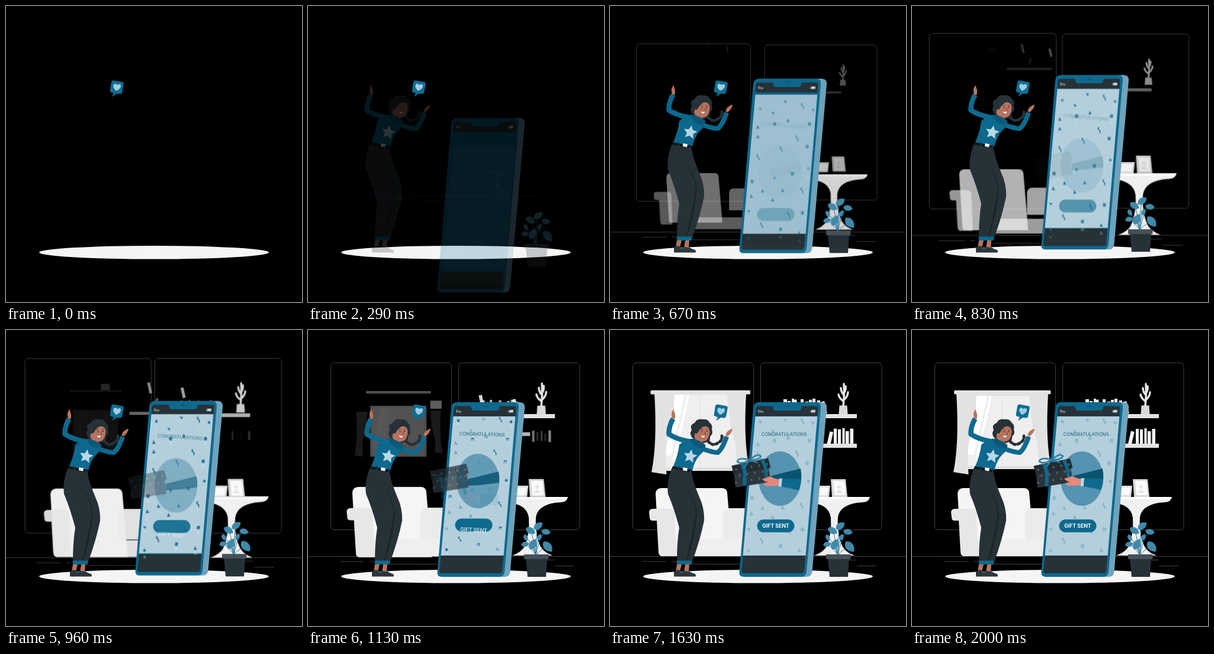
An HTML page that plays this animation: 500x500 px, repeating every 2040 ms.

```html
<!DOCTYPE html>
<html lang="en">
<head>
<meta charset="utf-8">
<title>Gift sent</title>
<style>
html, body { margin: 0; width: 100%; height: 100%; overflow: hidden; background: #000; }
svg { display: block; width: 100vw; height: 100vh; }
[data-zoom], [data-tilt] { transform-box: fill-box; transform-origin: center; }
[data-grow] { transform-box: view-box; transform-origin: 0 0; }
#room { transform-box: view-box; transform-origin: 250px 250px; }
.line { fill: none; stroke: #525252; stroke-width: .8; vector-effect: non-scaling-stroke; }
text { font-family: Inter, "Open Sans", sans-serif; text-anchor: middle; }
</style>
</head>
<body>
<svg viewBox="0 0 500 500">
  <g id="room">
    <path class="line" d="M0 382.500H500M53 391H95M104 391h8M132 395.500H219M370 388.500H416M417 398.500H450"/>
    <rect class="line" data-zoom="80" x="38.500" y="55.500" width="204" height="282" rx="6"/>
    <rect class="line" data-zoom="100" x="254.500" y="55.500" width="204.500" height="282" rx="6"/>

    <g data-zoom="820">
      <rect x="82" y="107" width="141" height="128" fill="#e0e0e0"/>
      <rect x="87" y="111" width="131" height="119" fill="#efefef"/>
      <path d="M108 111h19l-22 100h-18v-8zM131 111h4l-24 108h-4z" fill="#fff"/>
      <path d="M152 111v119" stroke="#e4e4e4" stroke-width="1.500"/>
    </g>
    <path data-zoom="950" d="M75 108H109Q107 160 96 190Q93 205 95.500 244L70 240Q80 190 75 108Z" fill="#e2e2e2"/>
    <path data-zoom="950" d="M230 108H198Q201 160 211 188Q214 205 212 234L236 237Q225 190 230 108Z" fill="#e2e2e2"/>
    <rect data-zoom="820" x="71" y="102" width="163.500" height="6.500" rx="2" fill="#e8e3e3"/>

    <rect data-grow="700" x="258" y="149" width="24" height="17" fill="#999"/>
    <rect data-grow="600" x="287" y="192" width="130" height="7" fill="#e2e2e2"/>
    <g id="lowBooks" fill="#f2f2f2"></g>
    <rect data-zoom="445" x="291" y="142" width="126" height="7" fill="#e2e2e2"/>
    <g id="topBooks" fill="#f2f2f2"></g>
    <g data-zoom="350">
      <path d="M387.500 127.500h13l1 14.500h-15z" fill="#d9d9d9"/>
      <path d="M394 128Q396 112 395 91M394 120Q387 115 386 109M395 118Q402 112 402 105M395 110Q390 104 390 98M395 107Q399 101 398 95" fill="none" stroke="#e6e6e6" stroke-width="3.400" stroke-linecap="round"/>
    </g>

    <path data-zoom="305" d="M77 277q0-9 9-10H189q8 0 9 8L207 382H88q-4 0-5-5Z" fill="#f5f5f5"/>
    <path data-zoom="340" d="M110 353H260v29H110z" fill="#efefef"/>
    <path data-zoom="320" d="M191 311q1-10 10-10h60v52h-70z" fill="#ebebeb"/>
    <path data-zoom="340" d="M66 308q0-6 7-6h27q9 0 9 8l3 72H88q-5 0-6-6L79 322H72q-5 0-5-5z" fill="#e6e7e6"/>

    <g data-zoom="80">
      <path d="M319 282H439q-2 9-12 9q-38 2-42 25q-2 30 8 50q6 10 20 15H345q14-5 20-14q10-22 8-50q-3-24-40-26q-12 0-14-9Z" fill="#f0f0f0"/>
      <path d="M319 282H439l-2 4H321z" fill="#fff"/>
    </g>
    <g data-zoom="150">
      <path d="M346 263h26l-2 19h-26z" fill="#dedede"/><path d="M350 266h19l-2 13h-19z" fill="#fafafa"/>
    </g>
    <g data-zoom="190">
      <path d="M373 252h25l3 30h-26z" fill="#d8d8d8"/><path d="M377 255h19l2 24h-19z" fill="#fafafa"/>
      <circle cx="387" cy="265" r="3" fill="#e4e4e4"/><path d="M382 275q5-10 10 0z" fill="#e4e4e4"/>
    </g>
  </g>

  <ellipse cx="250" cy="416.300" rx="194" ry="11.300" fill="#f5f5f5"/>

  <g data-slide="0" data-by="30">
    <g id="leaves" fill="#4089aa" stroke="#2f7797" stroke-width="1"></g>
    <path d="M368 386h36l-2 31h-31z" fill="#263238"/>
    <rect x="365" y="379" width="41.500" height="8" fill="#455059"/>
  </g>

  <g data-slide="0" data-by="88">
    <path d="M255 122H357q10 0 9 10L341.500 408q-1 9-10 9H240z" fill="#6ea3bb"/>
    <path d="M252 122H348q9 0 8 9L332 408q-1 9-9 9H226q-8 0-7.500-8L242 131q1-9 10-9Z" fill="#0e698e"/>
    <path d="M251 128.500H348q4 0 3.500 4L350.500 145.500H245.500L246.500 132q.5-3.500 4.500-3.500Z" fill="#263238"/>
    <path d="M274 122l2 10.500q1 3.500 4 3.500h39q3 0 4-3.500l2-10.500z" fill="#0e698e"/>
    <path d="M296.500 129h.5M300 129h1.500" stroke="#144c65" stroke-width="1.800" stroke-linecap="round"/>
    <path d="M251 134.500v5M253.500 135.500v4M256 136.500v3M258 137v2.500" stroke="#aeb8bc" stroke-width="1.300"/>
    <path d="M340 135h7l-.5 4.500h-7zM338 136.500h1v2h-1z" fill="#c6cfd3"/>
    <path d="M224.500 381H330.500L328 407q-.5 4-4 4H226q-4 0-4-4z" fill="#263238"/>
    <path data-slide="90" data-by="26" d="M245.500 146H350.300L330.500 381H224.500z" fill="#b4cfdb"/>
    <g id="confetti"></g>
    <ellipse data-slide="560" cx="287" cy="251" rx="36.300" ry="46" fill="#5593b0"/>
    <path data-slide="580" d="M270 247L322 234Q324 243 323 253L290 257L270 258Z" fill="#09536f"/>
    <g data-slide="970">
      <path d="M290 250L323 251Q322 262 319 270L290 264Z" fill="#0e698e"/>
      <path d="M285 250.500l6-.5-1.500 14-5-.5z" fill="#b9d6e3"/>
    </g>
    <g data-slide="375">
      <rect x="248.500" y="320" width="63" height="21.800" rx="10.900" fill="#0e698e"/>
    </g>
    <g data-slide="620"><text data-tilt="620" x="280" y="334" font-size="8.700" font-weight="700" fill="#fff">GIFT SENT</text></g>
    <g data-slide="450"><text data-tilt="490" x="294" y="178.700" font-size="7.800" fill="#155f7d">CONGRATULATIONS</text></g>
  </g>

  <g data-slide="650">
    <path d="M209 238L268 229L271 257L212 266.500Z" fill="#2b353c"/>
    <path d="M205.500 229.500L267 217L271.500 233L208.500 243.500Z" fill="#222c32"/>
    <g id="stars" fill="#59636a"></g>
  </g>
  <g data-slide="840" fill="#0e698e">
    <path d="M220 227l7-1.500 4 15-.5 23-6 1 .5-22z"/>
    <path d="M254 220l6-1.300 5 15 3 23.500-5 .8-3-23z"/>
  </g>
  <g data-slide="960">
    <path d="M236 219Q217 214 215 222Q222 228 236 219Q250 207 255 213Q252 220 236 219ZM236 219l-9 12M236 219l14 5" fill="none" stroke="#307e9f" stroke-width="2.600" stroke-linejoin="round"/>
  </g>
  <path data-slide="970" d="M257 251Q264 250 270 246.500Q275 249 285 252L284.500 262Q273 263 268 263Q260 263 259 259Q264 257 268 256Q260 256 257 251Z" fill="#e9897a"/>

  <g data-fade="0">
    <path d="M166 188Q173 197 182 191Q190 187 189 179" fill="none" stroke="#263238" stroke-width="5" stroke-linecap="round" stroke-dasharray="3 4.500"/>
    <path d="M164 186Q173 197 182 191Q190 187 189 178" fill="none" stroke="#263238" stroke-width="3.200" stroke-linecap="round"/>
    <path d="M140 183Q133 176 138 169Q134 160 143 157Q147 149 156 151Q165 150 168 156Q174 161 172 168Q175 175 169 180Q170 188 162 190Q148 195 140 183Z" fill="#263238"/>
    <path d="M105 150Q103 143 104.500 138.500L107.500 133.500L108.500 138Q111 142 109.500 150Z" fill="#b9735f"/>
    <path d="M195.500 178.500Q196 172 201 169.500L206 166.500Q207.500 168 205.500 171.500Q203 177 198.500 179.500Z" fill="#b9735f"/>
    <path d="M145 176L144 188L156 191L158 184Z" fill="#a0604e"/>
    <path d="M106.500 150Q99 163 99.500 176Q112 184.500 136 189" fill="none" stroke="#0e698e" stroke-width="8.500" stroke-linejoin="round"/>
    <path d="M197 180Q190 201 182 207Q174 207 157 201" fill="none" stroke="#0e698e" stroke-width="8" stroke-linejoin="round"/>
    <path d="M128 185Q140 182 149 186L161 194Q162 203 152 211Q143 220 139 238L106.500 231Q115 212 117 194Z" fill="#0e698e"/>
    <path d="M135 184Q145 182 161 194Q159 200 152 200Q141 197 135 184Z" fill="#0b5878"/>
    <path d="M117 194Q122 196 126 193M161 195Q158 203 154 207" fill="none" stroke="#0a5270"/>
    <path d="M146 172Q151 164 160 162Q168 163 168.500 171Q168 183 162 187Q155 190 148 186Q141 184 143 176Q144 173 146 172Z" fill="#b9735f"/>
    <path d="M142 174Q143 161 155 157Q166 156 169 166Q162 160 156 164Q150 169 147 175Z" fill="#263238"/>
    <path d="M153 177Q157 180 161 177Q160 183 157 182Q153 181 153 177Z" fill="#fff" stroke="#7b3730" stroke-width=".6"/>
    <path d="M155.500 171v1M163.500 170.500v1" stroke="#263238" stroke-width="1.600" stroke-linecap="round"/>
    <path d="M153 168.500l4-1M162 167.500l3.500 1M160 172l1.500 3.500h-2" fill="none" stroke="#633529" stroke-width=".8"/>
    <path id="bigStar" fill="#b9d8e6"/>
    <path d="M106 230L139 236.500L138 241L104 235Z" fill="#11181b"/>
    <path d="M123.500 232l7.500 1.500-1 5-7-1.500z" fill="#fff"/>
    <path d="M116 230v6M136 234v6" stroke="#263238" stroke-width="2"/>
    <path d="M104 234L138 240.500Q139 253 150 280Q160 301 159 322Q152 356 139 391H113Q113 358 117 334Q108 300 98 277Q95 258 104 234Z" fill="#263238"/>
    <path d="M127 264Q143 288 145 309Q138 352 128 391H130Q144 348 147 309Q144 285 127 264Z" fill="#1b2529"/>
    <path d="M113 396h8l-3 12h-7zM127 396h7l-1 12h-8z" fill="#b9735f"/>
    <path d="M112.500 389.500H139L137.500 396H113Z" fill="#0e698e"/>
    <path d="M108 416.500V408Q114 403 120 407Q127 411 136 411.500Q138 416 135 416.500ZM121 416.500L124 406Q130 409 134 407Q138 411 144 412Q146 416 144 416.500Z" fill="#2c373d"/>
    <path d="M119 409h4M133 407l3 2" stroke="#8fb2c2" stroke-width=".8"/>
  </g>

  <g>
    <path d="M182 125.700L196 128.200Q199.300 129 198.800 132L196 146Q195.300 149 192 148.500L187 148L179 153.500L182 147L178 146Q175.300 145.300 175.800 142L178 128.500Q178.800 125.200 182 125.700Z" fill="#0f6d93"/>
    <path d="M186 143.500Q178.500 136 182.500 132Q186 130 188 133.500Q191.500 130.500 194 133.500Q195.500 139 186 143.500Z" fill="#9fcde0"/>
  </g>
</svg>

<script>
const EASE = 'cubic-bezier(.36,-.01,.5,1.38)';
const LOOP = 2040, HOLD = 130, STEP = 1000 / 24;
const $ = id => document.getElementById(id);

function starPath(x, y, r, turn = 0) {
  let d = '';
  for (let i = 0; i < 10; i++) {
    const a = turn + i * Math.PI / 5, q = i % 2 ? r * .48 : r;
    d += `${i ? 'L' : 'M'}${(x + q * Math.sin(a)).toFixed(1)} ${(y - q * Math.cos(a)).toFixed(1)}`;
  }
  return d + 'Z';
}

// Books: x, width, height, lean, start time. Leaning ones fly in from the corner.
const book = base => ([x, w, h, lean, start]) =>
  `<g data-${lean ? 'grow' : 'zoom'}="${start}"><rect x="${x}" y="${base - h}" width="${w}" height="${h}" transform="rotate(${lean} ${x} ${base})"/></g>`;
$('topBooks').innerHTML = [
  [293, 6, 25, 0, 640], [300, 5, 22, 0, 650], [307, 4, 26, 0, 630], [314, 6, 24, -12, 560],
  [322, 5, 25, 0, 640], [330, 5, 21, 0, 660], [336, 5, 24, 0, 650], [342, 5, 26, 0, 640],
  [350, 5, 23, 0, 660], [361, 6, 21, -13, 510]
].map(book(142)).join('');
$('lowBooks').innerHTML = [
  [365, 6, 22, 13, 640], [378, 5, 25, 0, 750], [385, 5, 24, 0, 900],
  [392.5, 4, 26, 0, 850], [398, 5.5, 21, 0, 920], [405.5, 5.5, 25, 0, 720]
].map(book(192)).join('');

// Leaves: x, y, length, turn
$('leaves').innerHTML = [
  [389, 331, 9, -35], [376, 339, 9, 30], [402, 341, 8, 10], [368, 351, 6, 65],
  [391, 350, 6, -65], [367, 362, 7, -10], [380, 362, 10, -60], [405, 366, 11, 50]
].map(([x, y, r, a]) =>
  `<path fill="none" d="M385 380Q${(x + 382) / 2} ${y + 4} ${x} ${y}"/>` +
  `<path stroke="none" transform="translate(${x} ${y}) rotate(${a}) scale(${r})" d="M-1 0C-.6-.8 .4-.8 1 0C.4 .8-.6 .8-1 0Z"/>`).join('');

// Confetti shapes with their start times
const shapes = {
  o: ['<circle r="2.400"/>', 330],
  t: ['<path d="M-3-2L3-1L1 3Z"/>', 190],
  u: ['<path d="M-1-3.500L3 2.500L-3 3Z"/>', 220],
  q: ['<path d="M-2-3.500L3-2.500L2 3L-3 2Z"/>', 240],
  s: ['<path d="M-1-6q-2 3 1 5t1 5.500l2-.5q2-4-1-6t0-4z"/>', 270]
};
const spots = '254 155 o,275 171 t,296 152 t,324 155 s,343 157 o,301 182 u,337 187 q,250 193 u,278 187 q,' +
  '315 210 s,250 209 u,333 225 q,288 228 s,249 242 s,335 256 o,278 272 o,308 271 q,240 284 q,258 301 u,' +
  '292 300 u,323 298 s,239 310 u,275 316 u,325 337 q,234 337 t,255 357 s,288 365 q,301 340 s,234 373 o,320 372 u';
$('confetti').innerHTML = spots.split(',').map(s => {
  const [x, y, k] = s.split(' ');
  const [shape, start] = shapes[k];
  const piece = (at, fill, alpha) =>
    `<g data-slide="${at}"><g transform="translate(${x} ${y})" fill="${fill}" opacity="${alpha}">${shape}</g></g>`;
  return piece(start, '#1f7296', .95) + piece(start + 220, '#c8dfe8', .64);
}).join('');

let stars = '';
for (let i = 0; i < 14; i++) {
  const u = (i % 5) * 13 + (i > 4 && i < 10 ? 6 : 0), row = Math.floor(i / 5);
  stars += starPath(213 + Math.min(u, 54), 236 + row * 11 - u * .17, 2.6, i);
}
$('stars').innerHTML = `<path d="${stars}"/>`;
$('bigStar').setAttribute('d', starPath(135.5, 213.5, 12, .2));

const anims = [];
function play(el, frames, delay, opts = {}) {
  const a = el.animate(frames, { delay: +delay, duration: 1000, easing: EASE, fill: 'both', ...opts });
  a.pause();
  anims.push(a);
}
const each = (name, fn) =>
  document.querySelectorAll(`[data-${name}]`).forEach(el => fn(el, el.dataset[name]));
const enter = (from, to) => [{ opacity: 0, transform: from }, { opacity: 1, transform: to }];
const zoom = (el, at) => play(el, enter('scale(.5)', 'scale(1)'), at);

each('zoom', zoom);
each('grow', zoom);
each('slide', (el, at) => play(el, enter(`translateY(${el.dataset.by || 30}px)`, 'translateY(0px)'), at));
each('fade', (el, at) => play(el, [{ opacity: 0 }, { opacity: 1 }], at));
each('tilt', (el, at) => play(el, [{ transform: 'rotate(5deg)' }, { transform: 'rotate(0deg)' }],
  +at + 340, { duration: 450, easing: 'linear' }));
play($('room'), enter('scale(.4)', 'scale(1)'), 0);

const origin = performance.now();
function draw() {
  const t = Math.max(0, performance.now() - origin) % LOOP;
  const n = Math.floor((t - HOLD + 5.5) / STEP);
  const time = t < HOLD ? 0 : HOLD + n * STEP;
  for (const a of anims) a.currentTime = time;
  requestAnimationFrame(draw);
}
draw();
</script>
</body>
</html>
```
